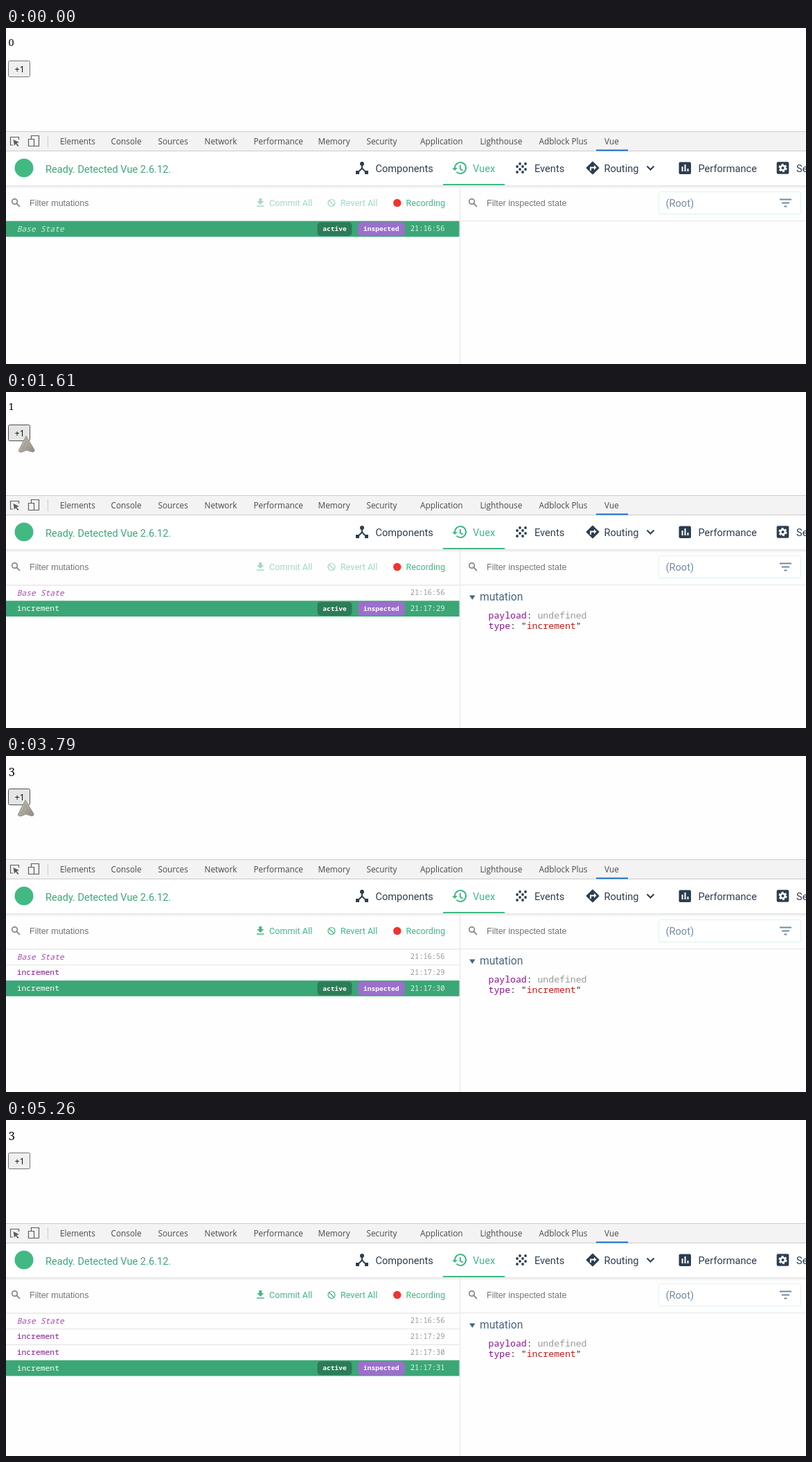
These frames come from a looping animation (1155 px wide and 485 px high, 5.68 s). An HTML page:

```html
<!DOCTYPE html>
<html lang="en">
<head>
<meta charset="utf-8">
<title>Counter with mutation log</title>
<style>
html, body { margin: 0; width: 100%; height: 100%; overflow: hidden; background: #fefefe; }
svg { display: block; }
.tabs { font: 11.8px "Open Sans", sans-serif; fill: #45494d; }
.nav { font: 14.6px Roboto, sans-serif; fill: #2c3e50; }
.tool { font: 12.6px Roboto, sans-serif; fill: #42b983; }
.hint { font: 12.5px "Liberation Sans", sans-serif; fill: #757575; }
.mono { font: 11.35px "Noto Sans Mono", monospace; }
.count { font-family: "Noto Serif", serif; fill: #111; }
.line { fill: none; stroke: currentColor; }
.row rect { fill: #fefefe; }
.row .name { fill: #881391; }
.row .time { font-size: 10.4px; fill: #999; }
.row .border { stroke: #e4e4e4; }
.row.base .name { font-style: italic; opacity: .75; }
.row.on rect { fill: #3ba776; }
.row.on text { fill: #fff; }
.row.on .name { font-weight: 500; }
.row.on .time { opacity: .85; }
.row.on .border { stroke: none; }
.badge { font-size: 9.55px; font-weight: 700; fill: #fff; }
.key { fill: #881391; }
.str { fill: #c41a16; }
.none { fill: #999; }
#button rect { fill: #efefef; stroke: #767676; }
#button.hover rect { fill: #e5e5e5; stroke: #4f4f4f; }
#button.press rect { fill: #f5f5f5; stroke: #8d8d8d; }
</style>
</head>
<body>
<svg width="1155" height="485" viewBox="0 0 1155 485">
  <defs>
    <linearGradient id="stone" x2="1" y2="1">
      <stop stop-color="#c9c5ba"/><stop offset=".55" stop-color="#aaa69b"/><stop offset="1" stop-color="#8f8b81"/>
    </linearGradient>
    <linearGradient id="shade" x2="0" y2="1">
      <stop stop-color="#000" stop-opacity=".1"/><stop offset="1" stop-color="#000" stop-opacity="0"/>
    </linearGradient>
    <g id="lens" class="line" stroke-width="1.5"><circle cx="4.5" cy="4.5" r="3.8"/><path d="M7.4 7.4L12 12"/></g>
  </defs>

  <text id="count" class="count" x="3.5"></text>
  <g id="button">
    <rect x="3.5" y="47.5" width="31" height="23" rx="2"/>
    <text x="12.5" y="64" style="font:12.5px 'Open Sans',sans-serif">+1</text>
  </g>

  <!-- browser tool tabs -->
  <rect y="149" width="1155" height="29" fill="#f3f3f3"/>
  <path d="M0 149.5H1155M0 177.5H1155M60.5 155V172" stroke="#cbcbcb"/>
  <g color="#5a5e62" class="line" stroke-width="1.2">
    <path d="M10 169H6.5V157.5H18.5V161"/>
    <path d="M10.500 161L19 165L15.500 166.200L18.500 170L17 171L14 167.300L12 170Z" fill="#5a5e62" stroke="none"/>
    <path d="M36.500 160V155.500H47.500V170.500H41M32.500 160.500H40.500V170.500H32.500Z"/>
  </g>
  <g class="tabs" id="tabs"></g>
  <path d="M852 176.500H898" stroke="#1a6fd8" stroke-width="2"/>

  <!-- panel header -->
  <rect y="178" width="1155" height="49" fill="#fff"/>
  <rect y="227" width="1155" height="5" fill="url(#shade)"/>
  <circle cx="26" cy="202" r="13.5" fill="#42b983"/>
  <g class="nav" id="nav"><text x="57" y="209" fill="#3ba776">Ready. Detected Vue 2.6.12.</text></g>
  <path d="M631 226H720" stroke="#42b983" stroke-width="2"/>
  <g fill="#2c3e50" color="#2c3e50">
    <g transform="translate(502 190)">
      <circle cx="12" cy="6" r="3"/><path d="M3 16H8V21H3ZM16 16H21V21H16Z"/>
      <path class="line" stroke-width="2" d="M12 7V12.500L6 18.500M12 12.500L18 18.500"/>
    </g>
    <g transform="translate(643 190)" color="#42b983" class="line" stroke-width="2">
      <path d="M5 12A8 8 0 1 1 7.350 17.650M12.750 8V13.400L16.600 15.700"/>
      <path d="M1 12H9L5 16Z" fill="#42b983" stroke="none"/>
    </g>
    <g id="grain"></g>
    <g transform="translate(847 202)">
      <rect x="-6.900" y="-6.900" width="13.800" height="13.800" rx="1" transform="rotate(45)"/>
      <path class="line" style="stroke:#fff" stroke-width="2" d="M-3 4V-.5H3"/><path d="M2-4L5.500-.5L2 3Z" fill="#fff"/>
    </g>
    <path class="line" stroke-width="2" d="M925.500 199.500L930.500 204.500L935.500 199.500"/>
    <rect x="971.500" y="193.500" width="17.500" height="17.500" rx="2"/>
    <path d="M976.500 200V207M980.500 197V207M984.500 203V207" stroke="#fff" stroke-width="2"/>
    <g transform="translate(1121.500 202)">
      <rect x="-8.800" y="-8.800" width="17.600" height="17.600" rx="2"/>
      <circle r="5" fill="none" stroke="#fff" stroke-width="2.200" stroke-dasharray="3 2.236"/>
      <circle r="3.300" fill="none" stroke="#fff" stroke-width="2.600"/>
    </g>
  </g>

  <!-- toolbars -->
  <use href="#lens" x="8" y="246" color="#777"/>
  <use href="#lens" x="668" y="246" color="#777"/>
  <text class="hint" x="34" y="256.500">Filter mutations</text>
  <text class="hint" x="694" y="256.500">Filter inspected state</text>
  <g class="tool">
    <g id="actions" color="#42b983">
      <path d="M365.300 246H369.300V250H372.300L367.300 255L362.300 250H365.300ZM362 256.300H372.600V257.700H362Z"/>
      <text x="380" y="257">Commit All</text>
      <g class="line" stroke-width="1.200"><circle cx="470" cy="252.500" r="5"/><path d="M466.500 249L473.500 256"/></g>
      <text x="483" y="257">Revert All</text>
    </g>
    <circle cx="564.800" cy="252.500" r="5.700" fill="#f0342f"/>
    <text x="577.500" y="257">Recording</text>
  </g>
  <rect x="942.500" y="236.500" width="205" height="32" rx="2" fill="#fff" stroke="#dcf4ea"/>
  <text class="nav" x="952.500" y="257.500" style="fill:#6f8ba3">(Root)</text>
  <path d="M1117 247.500H1134M1120 252.500H1131M1123.500 257.500H1127.500" stroke="#6f8ba3" stroke-width="1.800"/>
  <path d="M0 278.500H1155M655.500 229V485" stroke="#e6e6e6"/>

  <!-- mutation log -->
  <g class="mono" id="log"></g>
  <g class="mono badge" id="badges">
    <rect x="449.500" y="1.500" width="50" height="20" rx="5" fill="#2c7c58"/><text x="457.300" y="14.500">active</text>
    <rect x="508" y="1.500" width="68" height="20" rx="5" fill="#9a70cb"/><text x="516" y="14.500">inspected</text>
  </g>

  <g id="details">
    <path d="M669 293.500H677.500L673.250 300Z" fill="#476582"/>
    <text x="684" y="301" fill="#476582" style="font:15.6px Roboto,sans-serif">mutation</text>
    <g class="mono" style="font-size:13.15px" fill="#222">
      <text x="696.500" y="327"><tspan class="key">payload</tspan>: <tspan class="none">undefined</tspan></text>
      <text x="696.500" y="342"><tspan class="key">type</tspan>: "<tspan class="str">increment</tspan>"</text>
    </g>
  </g>

  <g id="cursor">
    <path d="M11 .5L23 20.500Q23.500 24 19 23.300L11.500 21L5 23.700Q-.5 24.500 .8 20.500Z" fill="url(#stone)" stroke="#8d897f" stroke-width=".9"/>
    <path d="M11 4L9 13L5 20M12 8L14 15L18 20M9 17L13 18" fill="none" stroke="#858177" stroke-opacity=".45"/>
  </g>
</svg>

<script>
const LOOP = 5680, ROW_TOP = 278.7, ROW_STEP = 22.7;
const $ = id => document.getElementById(id);
const label = (x, y, text, attrs = '') => `<text x="${x}" y="${y}" ${attrs}>${text}</text>`;

$('tabs').innerHTML = Object.entries({
  Elements: 78, Console: 151.5, Sources: 219.5, Network: 286.5, Performance: 357.5, Memory: 450.5,
  Security: 520.5, Application: 598, Lighthouse: 684.5, 'Adblock Plus': 769.5, Vue: 864
}).map(([name, x]) => label(x, 168, name)).join('');

$('nav').innerHTML += Object.entries({
  Components: 533.5, Vuex: 674, Events: 763, Routing: 863.5, Performance: 999.5, Settings: 1141
}).map(([name, x]) => label(x, 207.5, name, name === 'Vuex' ? 'fill="#42b983"' : '')).join('');

for (let i = 0; i < 16; i++) {
  const col = i % 4, row = i >> 2;
  if ((col + row) % 2) $('grain').innerHTML += `<circle cx="${738 + 4 * col}" cy="${196 + 4 * row}" r="1.9"/>`;
}

$('log').innerHTML = ['21:16:56', '21:17:29', '21:17:30', '21:17:31'].map((time, i) =>
  `<g class="row ${i ? '' : 'base'}" transform="translate(0 ${ROW_TOP + i * ROW_STEP})">
    <rect width="654.5" height="${ROW_STEP}"/>
    <path class="border" d="M0 .3H654.5M0 ${ROW_STEP + .3}H654.5"/>
    ${label(15.7, 15, i ? 'increment' : 'Base State', 'class="name"')}
    ${label(583.7, 14.6, time, 'class="time"')}
  </g>`).join('');
const rows = [...document.querySelectorAll('.row')];

// Latest value of a list of [start, value] pairs.
const at = (t, track) => track.reduce((value, [start, next]) => t >= start ? next : value, track[0][1]);
const mix = (a, b, u) => a.map((v, i) => v + (b[i] - v) * u);
const smooth = u => u * u * (3 - 2 * u);
const tick = (t, start, every) => Math.floor((t - start) / every + 1e-6);

const rest = [
  [820, null], [900, [30, 66]], [980, [22, 64]], [1060, [19, 63]], [1440, [18, 63]], [3470, [17, 63]]
];

function cursorAt(t) {
  if (t < 200) return null;
  if (t < 820) return mix([621, 342], [40, 69], smooth(Math.min(7, tick(t, 200, 77.1)) / 7));
  if (t < 4330) return at(t, rest);
  if (t < 4880) return mix([17, 63], [1087, 438], smooth((Math.min(6, tick(t, 4330, 78.5)) + 1) / 7));
  if (t < 4950 || t >= 5260) return null;
  return mix([1098, 441], [1104, 470], tick(t, 4950, 77.5) / 3);
}

const show = (el, on) => el.style.display = on ? '' : 'none';

function draw(t) {
  const count = at(t, [[0, 0], [1300, 1], [2550, 2], [3790, 3]]);
  $('count').textContent = count;
  $('count').setAttribute('y', count === 3 ? 28.5 : 26);
  $('count').style.fontSize = count === 3 ? '17px' : '14.5px';

  $('button').setAttribute('class', at(t, [
    [0, ''], [1060, 'hover'], [1220, 'press'], [1300, 'hover'], [2390, 'press'], [2550, 'hover'],
    [3700, 'press'], [3790, 'hover'], [4330, '']
  ]));

  const active = at(t, [[0, 0], [1610, 1], [2920, 2], [4170, 3]]);
  rows.forEach((row, i) => {
    show(row, i <= active);
    row.classList.toggle('on', i === active);
  });
  $('badges').setAttribute('transform', `translate(0 ${ROW_TOP + active * ROW_STEP})`);
  show($('details'), active > 0);
  $('actions').style.opacity = at(t, [[0, .5], [1680, .75], [1850, 1]]);

  const pos = cursorAt(t);
  show($('cursor'), pos);
  if (pos) $('cursor').setAttribute('transform', `translate(${pos.map(Math.round)})`);
}

const begin = performance.now();
function frame() {
  draw((performance.now() - begin) % LOOP);
  requestAnimationFrame(frame);
}
frame();
</script>
</body>
</html>
```
